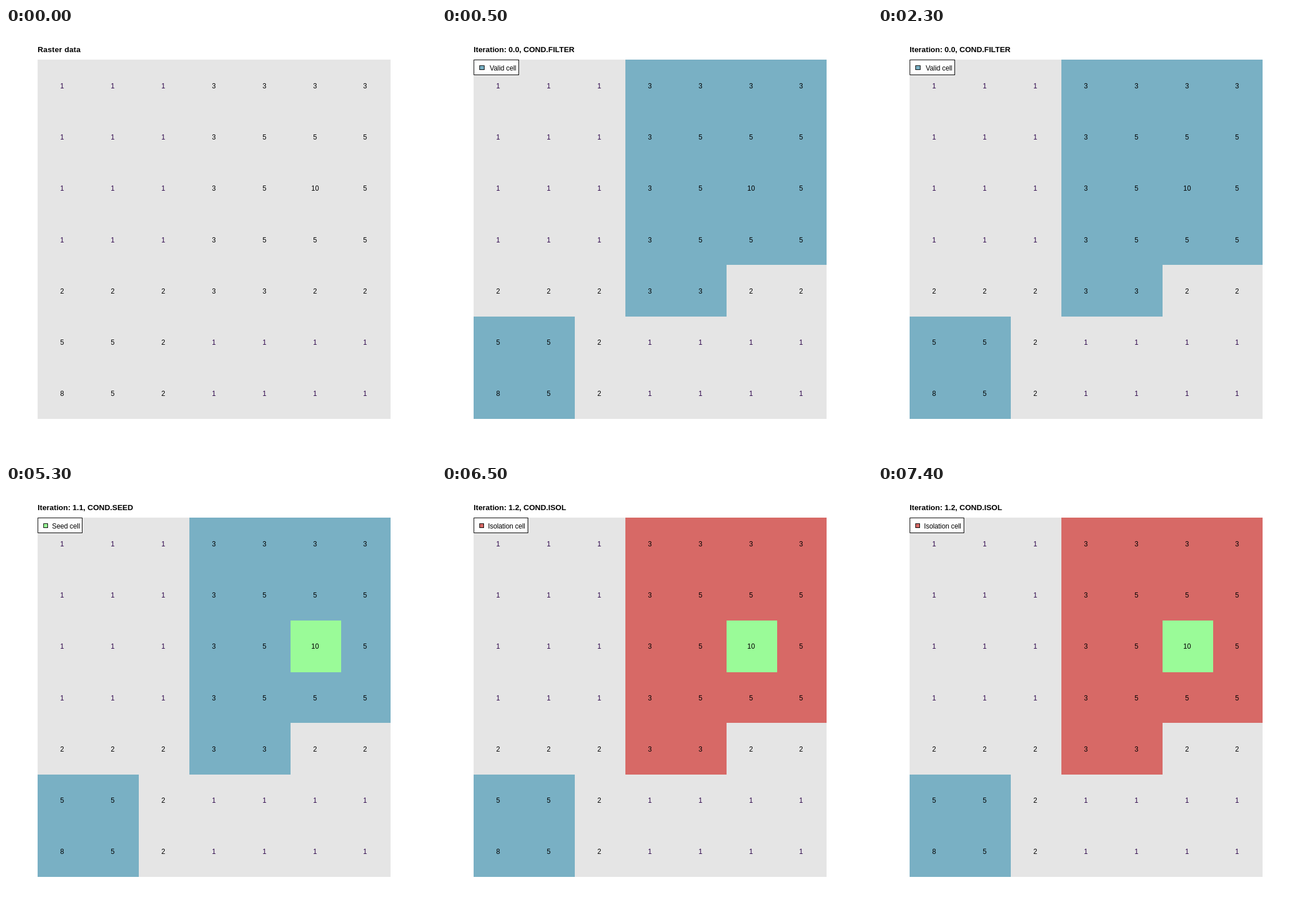
Write an HTML page that moves like this. It is 748 px wide and 748 px high and loops after 8000 ms.

```html
<!DOCTYPE html>
<html lang="en">
<head>
<meta charset="utf-8">
<title>Raster classification</title>
<style>
  html, body { margin: 0; width: 100%; height: 100%; overflow: hidden; background: #fff; }
  svg { display: block; width: 748px; height: 748px; font: 12px "Liberation Sans", Arial, sans-serif; }
  rect, path { shape-rendering: crispEdges; }
  .title { font-weight: bold; font-size: 13.35px; }
  .raw .title { letter-spacing: .2px; }
  .label { letter-spacing: -.1px; }
  .values { text-anchor: middle; }
  .one { fill: #2a0048; }
  .box { fill: #fff; stroke: #000; }
  .swatch { stroke: #000; }
  .valid { fill: #79b0c4; }
  .seed { fill: #9afb98; }
  .isol { fill: #d76966; }

  .step { visibility: hidden; animation: 8s step-end infinite; }
  .raw { animation-name: raw; }
  .filter { animation-name: filter; }
  .pick { animation-name: pick; }
  .grow { animation-name: grow; }
  .from-filter { animation-name: from-filter; }
  .from-pick { animation-name: from-pick; }
  @keyframes raw { 0% { visibility: visible } 6.25%, 100% { visibility: hidden } }
  @keyframes filter { 0% { visibility: hidden } 6.25% { visibility: visible } 43.75%, 100% { visibility: hidden } }
  @keyframes pick { 0% { visibility: hidden } 43.75% { visibility: visible } 81.25%, 100% { visibility: hidden } }
  @keyframes grow { 0% { visibility: hidden } 81.25%, 100% { visibility: visible } }
  @keyframes from-filter { 0% { visibility: hidden } 6.25%, 100% { visibility: visible } }
  @keyframes from-pick { 0% { visibility: hidden } 43.75%, 100% { visibility: visible } }
</style>
</head>
<body>
<svg viewBox="0 0 748 748">
  <rect x="55" y="55" width="614" height="625" fill="#e5e5e5"/>
  <path class="step from-filter valid" d="M319 55H669V412H495V502H319zM55 502H231V680H55z"/>
  <path class="step grow isol" d="M319 55H669V412H495V502H319z"/>
  <rect class="step from-pick seed" x="495" y="234" width="88" height="90"/>

  <g class="step raw">
    <text class="title" x="55" y="42">Raster data</text>
  </g>
  <g class="step filter">
    <text class="title" x="55" y="42">Iteration: 0.0, COND.FILTER</text>
    <rect class="box" x="55.5" y="55.5" width="78" height="26"/>
    <rect class="swatch valid" x="65.5" y="65.5" width="8" height="7"/>
    <text class="label" x="83" y="74">Valid cell</text>
  </g>
  <g class="step pick">
    <text class="title" x="55" y="42">Iteration: 1.1, COND.SEED</text>
    <rect class="box" x="55.5" y="55.5" width="77" height="26"/>
    <rect class="swatch seed" x="65.5" y="65.5" width="7" height="7"/>
    <text class="label" x="80" y="74">Seed cell</text>
  </g>
  <g class="step grow">
    <text class="title" x="55" y="42">Iteration: 1.2, COND.ISOL</text>
    <rect class="box" x="55.5" y="55.5" width="94" height="26"/>
    <rect class="swatch isol" x="65.5" y="65.5" width="7" height="7"/>
    <text class="label" x="80" y="74">Isolation cell</text>
  </g>
  <g class="values"></g>
</svg>
<script>
  const rows = [
    [1, 1, 1, 3, 3, 3, 3],
    [1, 1, 1, 3, 5, 5, 5],
    [1, 1, 1, 3, 5, 10, 5],
    [1, 1, 1, 3, 5, 5, 5],
    [2, 2, 2, 3, 3, 2, 2],
    [5, 5, 2, 1, 1, 1, 1],
    [8, 5, 2, 1, 1, 1, 1]
  ];
  const values = document.querySelector('.values');

  rows.forEach((row, r) => row.forEach((value, c) => {
    const text = document.createElementNS('http://www.w3.org/2000/svg', 'text');
    text.setAttribute('x', Math.min(97.7 + 88 * c, 624.7));
    text.setAttribute('y', Math.round(105 + 89.17 * r));
    if (value === 1) text.setAttribute('class', 'one');
    text.textContent = value;
    values.append(text);
  }));
</script>
</body>
</html>
```
